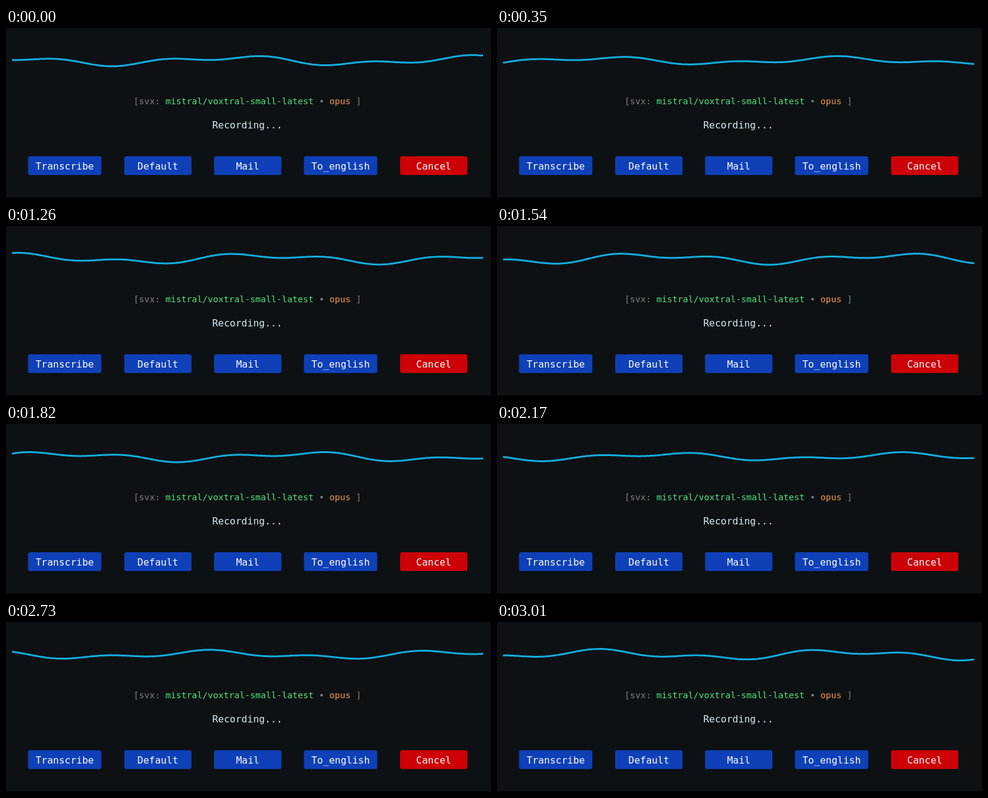
An HTML page for the animation above (3.08 s loop, 800x281 px).

```html
<!DOCTYPE html>
<html lang="en">
<head>
<meta charset="utf-8">
<title>Recorder</title>
<style>
  html, body { margin: 0; width: 100%; height: 100%; overflow: hidden; background: #0d1113; }
  svg { display: block; width: 100vw; height: 100vh; }
  text { font-family: "DejaVu Sans Mono", "Liberation Mono", monospace; font-size: 16px; text-anchor: middle; }
  .info { font-size: 14.5px; fill: #7e8386; }
  .model { fill: #52e57b; }
  .codec { fill: #f6994b; }
  .status { fill: #d8ecf8; }
  #buttons text { fill: #fff; }
  #wave { fill: none; stroke: #12aee0; stroke-width: 3; stroke-linejoin: round; }
</style>
</head>
<body>
<svg viewBox="0 0 800 281">
  <rect width="800" height="281" fill="#0d1113"/>
  <rect y="280" width="800" height="1" fill="#000"/>
  <path id="wave"/>
  <text class="info" x="398.3" y="126">[svx: <tspan class="model">mistral/voxtral-small-latest</tspan> • <tspan class="codec">opus</tspan> ]</text>
  <text class="status" x="398" y="165.5">Recording...</text>
  <g id="buttons"></g>
</svg>
<script>
const LOOP = 3080, STEP = 70;
const LEFT = 10, RIGHT = 787, MIDDLE = 54;
const BLUE = '#0f40b8', RED = '#cc0006';
const TAU = 2 * Math.PI;
const wave = document.getElementById('wave');

function add(parent, tag, attributes) {
  const node = document.createElementNS('http://www.w3.org/2000/svg', tag);
  for (const [key, value] of Object.entries(attributes)) node.setAttribute(key, value);
  return parent.appendChild(node);
}

function addButton(label, x, width, fill) {
  const group = document.getElementById('buttons');
  add(group, 'rect', { x, y: 212, width, height: 31, rx: 3, fill });
  add(group, 'text', { x: x + width / 2, y: 233.5 }).textContent = label;
}

addButton('Transcribe', 36.3, 121, BLUE);
addButton('Default', 195, 111, BLUE);
addButton('Mail', 343.2, 111, BLUE);
addButton('To_english', 491.4, 121, BLUE);
addButton('Cancel', 650, 111, RED);

// Two sines travel left together while their shared loudness swells.
function draw(time) {
  const crest = 770 - 0.595 * time;
  const loudness = 0.86 + 0.15 * Math.cos(TAU * (time - 1480) / 1800);
  const points = [];
  for (let x = LEFT; x <= RIGHT; x += 3) {
    const u = TAU * (x - crest);
    const y = MIDDLE - loudness * (6 * Math.cos(u / 397) + 4 * Math.cos(u / 170));
    points.push(`${x} ${y.toFixed(2)}`);
  }
  wave.setAttribute('d', 'M' + points.join('L'));
}

const start = performance.now();
function tick() {
  const time = (performance.now() - start) % LOOP;
  draw(Math.floor(time / STEP) * STEP);
  requestAnimationFrame(tick);
}
tick();
</script>
</body>
</html>
```
